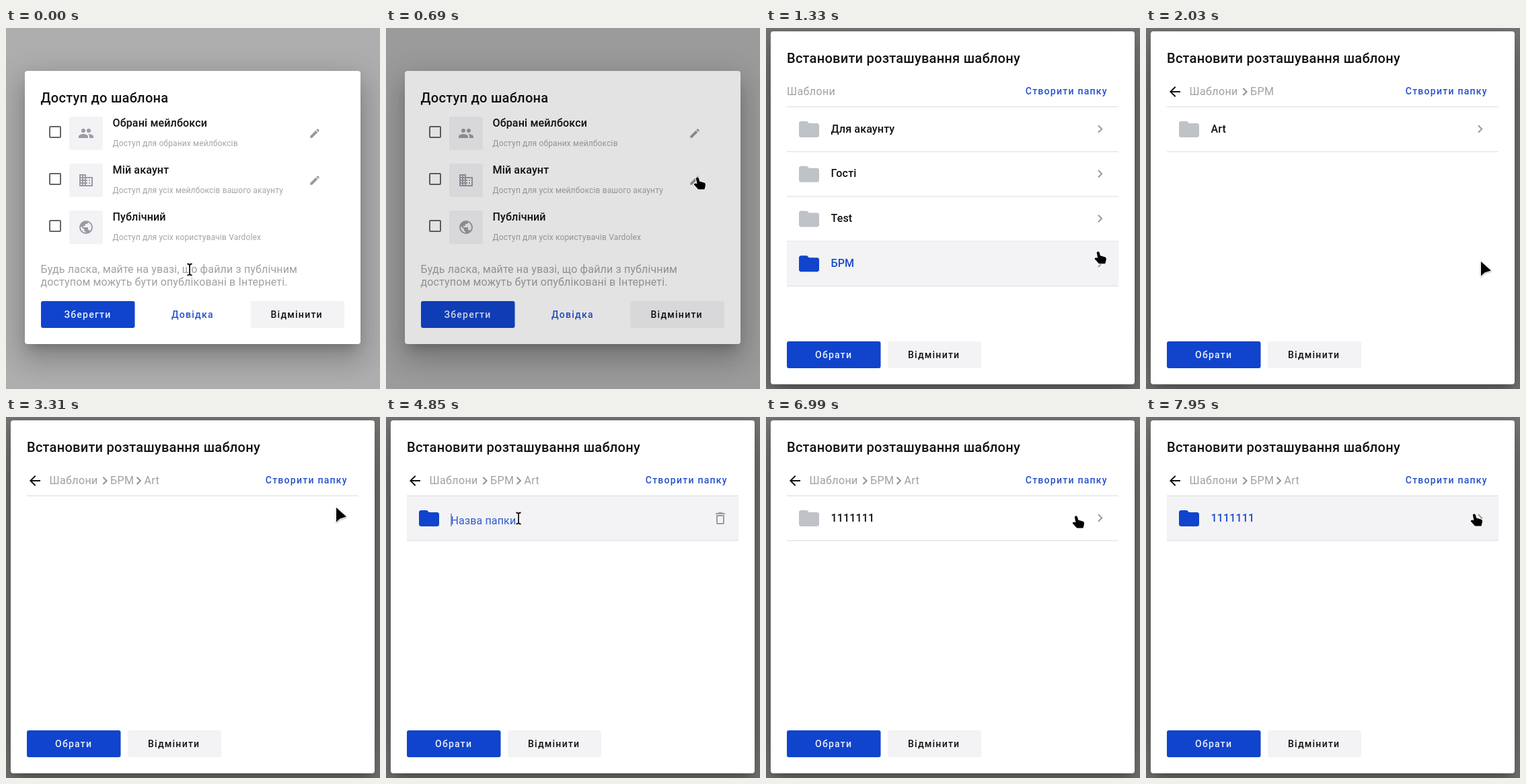
An HTML page for the animation above (8000 ms loop, 556x538 px).

```html
<!DOCTYPE html>
<html lang="uk">
<head>
<meta charset="utf-8">
<title>Розташування шаблону</title>
<style>
html, body { margin: 0; width: 100%; height: 100%; overflow: hidden; }
#stage { position: relative; width: 556px; height: 538px; overflow: hidden; background: #aeaeae; }
.panel { position: absolute; background: #fff; border-radius: 4px;
  box-shadow: 0 11px 15px -7px rgba(0,0,0,.2), 0 24px 38px 3px rgba(0,0,0,.14), 0 9px 46px 8px rgba(0,0,0,.12); }
#access { left: 28px; top: 64px; width: 499px; height: 407px; }
#place { left: 7px; top: 5px; width: 541px; height: 526px; }
#shade { position: absolute; inset: 0; background: rgba(0,0,0,.32); }
svg { position: absolute; left: 0; top: 0; width: 100%; height: 100%; overflow: visible; }
text { font-family: Roboto, "Noto Sans", sans-serif; font-size: 16px; letter-spacing: .15px; fill: #111; white-space: pre; }
.title { font-size: 20px; font-weight: 500; letter-spacing: .25px; }
.name { font-weight: 500; }
.note { font-size: 12px; fill: #a3a4aa; }
.para { fill: #a0a1a6; }
.crumb { fill: #a0a0a3; letter-spacing: .4px; }
.btn { font-size: 14px; font-weight: 500; letter-spacing: 1.25px; }
.white { fill: #e9eefb; }
.link { fill: #2550cf; }
.blue { fill: #1a4bcd; }
.input { fill: #3059cf; }
</style>
</head>
<body>
<div id="stage">
  <div id="access" class="panel"><svg viewBox="28 64 499 407"></svg></div>
  <div id="shade"></div>
  <div id="place" class="panel"><svg viewBox="7 5 541 526"></svg></div>
  <svg id="pointer" viewBox="0 0 556 538"></svg>
</div>
<script>
const LOOP = 8000, BLUE = '#1144cc', PALE = '#f3f3f6', GREY = '#9a9ca4';
const TOP = 117.5, PITCH = 66.75;
const $ = s => document.querySelector(s);

const ICON = {
  folder: 'M10 4H4c-1.1 0-2 .9-2 2v12c0 1.1.9 2 2 2h16c1.1 0 2-.9 2-2V8c0-1.1-.9-2-2-2h-8z',
  next: 'M10 6 8.6 7.4 13.2 12l-4.6 4.6L10 18l6-6z',
  back: 'M20 11H7.8l5.6-5.6L12 4l-8 8 8 8 1.4-1.4L7.8 13H20z',
  bin: 'M6 19c0 1.1.9 2 2 2h8c1.1 0 2-.9 2-2V7H6zM8 9h8v10H8zM15.5 4l-1-1h-5l-1 1H5v2h14V4z',
  check: 'M9 16.2 4.8 12l-1.4 1.4L9 19 21 7l-1.4-1.4z',
  pencil: 'M3 17.25V21h3.75L17.8 9.95 14.05 6.2zM20.7 7c.4-.4.4-1 0-1.4l-2.3-2.3c-.4-.4-1-.4-1.4 0l-1.85 1.8 3.75 3.75z',
  people: 'M13 8a3 3 0 1 1 6 0a3 3 0 1 1-6 0zM5 8a3 3 0 1 1 6 0a3 3 0 1 1-6 0zM8 13c-2.3 0-7 1.2-7 3.5V19h14v-2.5C15 14.2 10.3 13 8 13zM16 13l-1 .05c1.2.8 2 2 2 3.45V19h6v-2.5c0-2.3-4.7-3.5-7-3.5z',
  office: 'M2 3h10v4h10v14H2zM4 5v2h2V5zM8 5v2h2V5zM4 9v2h2V9zM8 9v2h2V9zM4 13v2h2v-2zM8 13v2h2v-2zM4 17v2h2v-2zM8 17v2h2v-2zM12 9v2h2v2h-2v2h2v2h-2v2h8V9zM16 11h2v2h-2zM16 15h2v2h-2z',
  globe: 'M2 12a10 10 0 1 1 20 0a10 10 0 1 1-20 0zM11 19.9V18c-1.1 0-2-.9-2-2v-1l-4.8-4.8A8 8 0 0 0 11 19.9zM17.9 17.4A8 8 0 0 0 15 4.6V5c0 1.1-.9 2-2 2h-2v2c0 .5-.5 1-1 1H8v2h6c.5 0 1 .5 1 1v3h1c.9 0 1.6.6 1.9 1.4z'
};

const text = (x, y, s, cls) => `<text x="${x}" y="${y}" class="${cls}">${s}</text>`;
const box = (x, y, w, h, fill, more = '') => `<rect x="${x}" y="${y}" width="${w}" height="${h}" fill="${fill}" ${more}/>`;
const icon = (name, x, y, fill, k = 1) =>
  `<path d="${ICON[name]}" fill="${fill}" fill-rule="evenodd" transform="translate(${x} ${y}) scale(${k})"/>`;
const button = (x, y, w, fill, tx, s, cls = '') =>
  box(x, y, w, 40, fill, 'rx="3"') + text(tx, y + 24.5, s, 'btn ' + cls);
const rule = y => box(31, y - .5, 493, 1, '#dcdcde');

function accessOption([name, note, pic, editable], i) {
  const y = i * 70;
  return box(65, 147 + y, 16, 16, 'none', 'rx="1" stroke="#666" stroke-width="2"') +
    box(94, 132 + y, 50, 50, PALE, 'rx="3"') + icon(pic, 107, 145 + y, GREY) +
    text(158.5, 147 + y, name, 'name') + text(158.5, 175.5 + y, note, 'note') +
    (editable ? icon('pencil', 450, 148 + y, '#97989c', .75) : '');
}

$('#access svg').innerHTML = text(51.5, 111, 'Доступ до шаблона', 'title') + [
  ['Обрані мейлбокси', 'Доступ для обраних мейлбоксів', 'people', true],
  ['Мій акаунт', 'Доступ для усіх мейлбоксів вашого акаунту', 'office', true],
  ['Публічний', 'Доступ для усіх користувачів Vardolex', 'globe', false]
].map(accessOption).join('') +
  text(51.5, 364.5, 'Будь ласка, майте на увазі, що файли з публічним', 'para') +
  text(51.5, 383.5, 'доступом можуть бути опубліковані в Інтернеті.', 'para') +
  button(52, 407, 139.5, BLUE, 86.5, 'Зберегти', 'white') +
  text(246, 432, 'Довідка', 'btn link') +
  button(363.5, 407, 139.5, PALE, 393.5, 'Відмінити');

// Pointer stops: time, x, y
const PATH = [
  [160, 273, 360], [620, 463, 222], [1010, 463, 222], [1420, 498, 348], [2060, 498, 348],
  [2520, 497, 150], [2900, 497, 150], [3250, 491, 135], [3640, 491, 135], [3820, 455, 96],
  [4270, 455, 96], [4830, 197, 151], [5750, 197, 151], [6190, 356, 168], [6600, 461, 147],
  [7250, 461, 147], [7700, 488, 144]
];
const KEYS = [5120, 5230, 5390, 5450, 5510, 5570, 5630];
const ADDED = 3840, SAVED = 6880;

const clamp = v => Math.min(1, Math.max(0, v));
const easeOut = p => 1 - Math.pow(1 - clamp(p), 2.4);

function pointerAt(t) {
  const i = PATH.findIndex(p => p[0] > t);
  if (i === 0) return PATH[0].slice(1);
  if (i < 0) return PATH[PATH.length - 1].slice(1);
  const [a, b] = [PATH[i - 1], PATH[i]];
  const p = (t - a[0]) / (b[0] - a[0]), e = p * p * (3 - 2 * p);
  return [a[1] + (b[1] - a[1]) * e, a[2] + (b[2] - a[2]) * e];
}

function rowsAt(t) {
  if (t < 1870) return ['Для акаунту', 'Гості', 'Test', 'БРМ'];
  if (t < 2830) return ['Art'];
  return t < ADDED ? [] : ['1111111'];
}

function crumbs(t) {
  if (t < 1560) return text(31, 100, 'Шаблони', 'crumb');
  return icon('back', 31, 83, '#111') + text(64.5, 100, 'Шаблони', 'crumb') +
    icon('next', 135, 83, '#909196') + text(155, 100, 'БРМ', 'crumb') +
    (t < 2670 ? '' : icon('next', 185.3, 83, '#909196') + text(205.5, 100, 'Art', 'crumb'));
}

function row(name, i, hot) {
  const y = TOP + i * PITCH;
  return (hot ? box(31, y, 493, PITCH, PALE) : '') +
    icon('folder', 46, y + 15.5, hot ? BLUE : '#bfc3c7', 1.5) +
    text(96.5, y + 38, name, 'name' + (hot ? ' blue' : '')) +
    icon('next', 484.6, y + 21, '#9a9b9f') + rule(y + PITCH);
}

function editRow(t) {
  const typed = KEYS.filter(k => k <= t);
  const n = typed.length, since = n ? typed[n - 1] : ADDED;
  const caret = (t - since) % 1000 < 500;
  return box(31, TOP, 493, PITCH, PALE) + icon('folder', 46, 133, BLUE, 1.5) +
    (n ? text(96.5, 158.5, '1'.repeat(n), 'input') : text(96.5, 159.5, 'Назва папки', 'input')) +
    (caret ? box(96.5 + n * 9.13, 144, 1, 19, '#2b3f80') : '') +
    (n ? icon('check', 449, 139, GREY) : '') + icon('bin', 485, 139, GREY) + rule(TOP + PITCH);
}

const SHAPE = {
  arrow: '<path d="M0 0V21.5L5.5 16.5 15 13.5z" stroke="#fff" stroke-width="1.6" stroke-linejoin="round" paint-order="stroke" style="filter:drop-shadow(0 1px 1px rgba(0,0,0,.35))"/>',
  hand: '<path d="M-2.2 2Q0-1.6 2 2L3.2 6.6 10 8.6Q12.4 9.6 12 12.5L10.5 18.5H1.2L-5.4 11.2Q-4.6 8.4-.6 10z" stroke="#fff" stroke-width="1.8" stroke-linejoin="round" paint-order="stroke"/>',
  beam: ['#fff" stroke-width="3.6', '#111" stroke-width="1.8'].map(s =>
    `<path d="M-3.6-8.5Q0-8.5 0-6Q0-8.5 3.6-8.5M0-6V6M-3.6 8.5Q0 8.5 0 6Q0 8.5 3.6 8.5" fill="none" stroke="${s}"/>`).join('')
};

function pointerKind(t, x, y, hover, editing) {
  if (t < 700) return y > 350 ? 'beam' : Math.hypot(x - 459, y - 226) < 12 ? 'hand' : 'arrow';
  if (hover >= 0) return editing && x < 340 ? 'beam' : 'hand';
  return t > 1010 && x > 386 && y < 110 ? 'hand' : 'arrow';
}

const last = new Map();
function put(el, html) {
  if (last.get(el) === html) return;
  last.set(el, html);
  el.innerHTML = html;
}

const shade = $('#shade'), place = $('#place'), list = $('#place svg'), pointer = $('#pointer');

function draw(t) {
  const open = easeOut((t - 698) / 150);
  shade.style.opacity = easeOut((t - 640) / 320);
  place.style.opacity = open;
  place.style.transform = `scale(${.7 + .3 * open})`;

  const [x, y] = pointerAt(t), rows = rowsAt(t);
  const editing = t >= ADDED && t < SAVED;
  const over = Math.floor((y - TOP) / PITCH);
  const hover = t > 1010 && over >= 0 && over < rows.length ? over : -1;
  const settled = t >= SAVED && t < 7270;

  put(list, text(31, 51.5, 'Встановити розташування шаблону', 'title') +
    crumbs(t) + text(385.8, 98.7, 'Створити папку', 'btn link') +
    (editing ? editRow(t) : rows.map((n, i) => row(n, i, i === hover && !settled)).join('')) +
    rule(TOP) +
    button(31, 467, 139.5, BLUE, 73, 'Обрати', 'white') +
    button(181, 467, 139, PALE, 211, 'Відмінити'));
  put(pointer, `<g transform="translate(${x.toFixed(2)} ${y.toFixed(2)})">${SHAPE[pointerKind(t, x, y, hover, editing)]}</g>`);
}

const start = performance.now();
function tick() {
  draw((performance.now() - start) % LOOP);
  requestAnimationFrame(tick);
}
tick();
</script>
</body>
</html>
```
